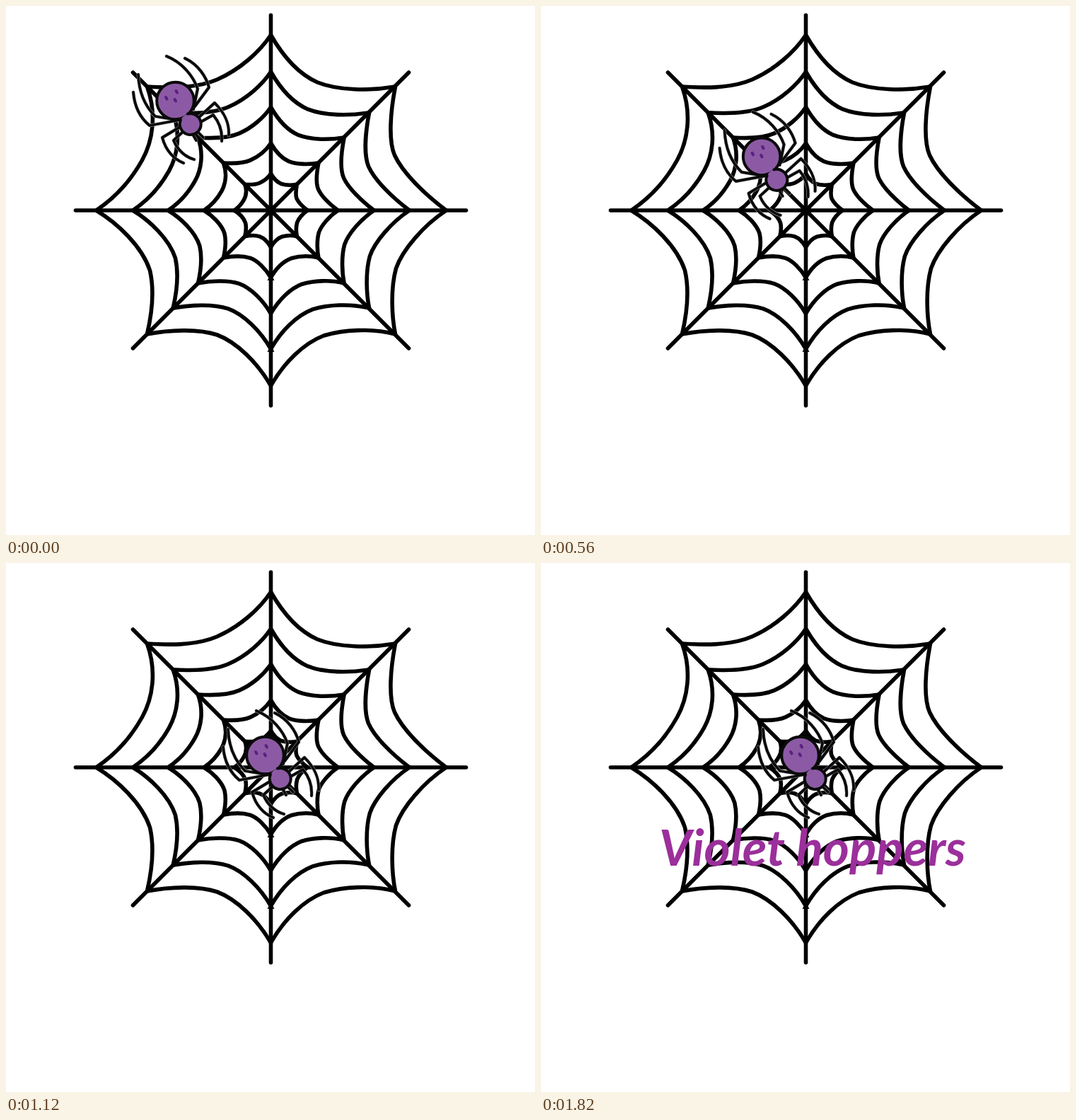
Animation, 748 px wide and 748 px high, one loop 1.96 s. Source, as an HTML page:

```html
<!DOCTYPE html>
<html lang="en">
<head>
<meta charset="utf-8">
<title>Spider on a web</title>
<style>
  html, body { margin: 0; height: 100%; overflow: hidden; background: #fff; }
  svg { display: block; width: 100%; height: 100%; }
  path, circle { stroke-linecap: round; stroke-linejoin: round; }
  .line { fill: none; stroke: #000; stroke-width: 5.6; }
  #ring { vector-effect: non-scaling-stroke; }
  .body { fill: #8c5aa4; stroke: #0a0a0a; stroke-width: 4; }
  text { font: italic 700 71px Lato, sans-serif; fill: #9b2f9b; text-anchor: middle; }
</style>
</head>
<body>
<svg viewBox="0 0 748 748">
  <defs>
    <path id="ring" class="line" d="M0-248C20-213 41-192 66-181C96-169 141-169 176-175
      C169-139 166-99 175-78C186-54 216-24 248 0
      C216 21 186 56 177 82C169 111 171 151 176 175
      C141 166 102 169 75 177C46 188 18 216 0 248
      C-19 215-49 186-76 176C-104 167-144 169-175 175
      C-167 141-165 111-171 85C-182 51-217 18-247 0
      C-220-18-197-44-182-71C-167-98-161-136-175-175
      C-145-173-106-172-76-185C-44-199-16-224 0-248Z"/>
    <path id="legs" fill="none" d="M227 71C250 80 265 100 271 117L265 146
      M253 74C272 83 283 100 287 115L267 142
      M272 158L295 137C310 152 316 166 315 183
      M277 163L293 154C302 165 306 178 305 191
      M187 97C188 124 198 143 211 156L241 161
      M180 122C182 145 192 160 203 169L246 161
      M246 171L221 186C226 205 238 217 251 222
      M251 177L237 190C243 205 255 214 266 217
      M265 183L269 190M273 180L279 186"/>
  </defs>

  <g transform="translate(374.5 289)">
    <path class="line" d="M0-276V276M-276 0H276M-195-195L195 195M195-195L-195 195"/>
    <g id="rings"></g>
    <path d="M-5 99l5-9 5 9zM-5 200l5-9 5 9z"/>
  </g>

  <g id="spider">
    <use href="#legs" stroke="#aaa" stroke-width="4.8"/>
    <use href="#legs" stroke="#0a0a0a" stroke-width="3.8"/>
    <circle class="body" cx="239.5" cy="134" r="26.300"/>
    <circle cx="261" cy="167" r="15" fill="#8c5aa4"/>
    <path class="body" d="M257 152.500A15 15 0 1 1 247 161"/>
    <path fill="none" stroke="#5c2080" stroke-width="4" d="M226 129l1.500 2.500M240.500 120l1.500 2.500M238.500 132l1.500 2.500"/>
  </g>

  <text id="title" x="384" y="428">Violet hoppers</text>
</svg>
<script>
  const get = id => document.getElementById(id);
  const LOOP = 1960, STEP = 70, STEPS = 14;

  get('rings').innerHTML = [248, 196, 146, 95, 52]
    .map(r => `<use href="#ring" transform="scale(${r / 248})"/>`).join('');

  function draw(now) {
    const tick = Math.floor(now % LOOP / STEP);
    const walk = Math.min(tick, STEPS) / STEPS;
    get('spider').setAttribute('transform', `translate(${127 * walk} ${138 * walk})`);
    // One short flash after arrival, then a slower blink
    const shown = tick === 15 || tick >= 18 && (tick - 18) % 4 < 2;
    get('title').style.visibility = shown ? 'visible' : 'hidden';
  }

  let start;
  function frame(now) {
    start ??= now;
    draw(now - start);
    requestAnimationFrame(frame);
  }
  draw(0);
  requestAnimationFrame(frame);
</script>
</body>
</html>
```
